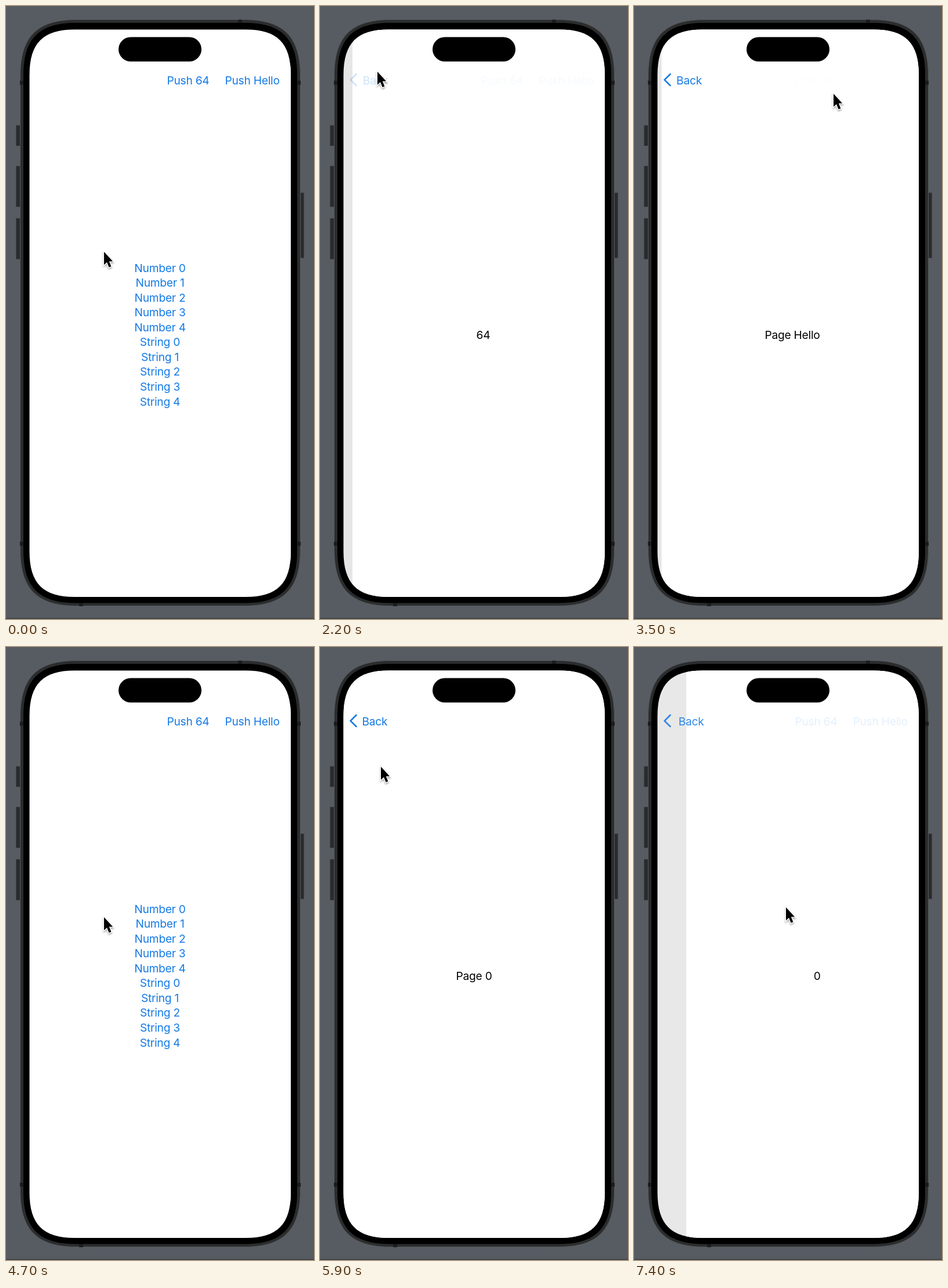
Recreate the animation shown at these times as an HTML page. Size 531x1055 px, loop 7500 ms.

```html
<!DOCTYPE html>
<html lang="en">
<head>
<meta charset="utf-8">
<title>Navigation demo</title>
<style>
  html, body { margin: 0; width: 100%; height: 100%; overflow: hidden; background: #565c62; }
  svg { display: block; width: 100vw; height: 100vh; }
  text { font: 400 19.2px Inter, Roboto, sans-serif; letter-spacing: -.25px; }
  .link { fill: #147ae6; }
  .mid { text-anchor: middle; }
  .side { fill: #2a2b2c; stroke: #3d3f41; }
  .band { fill: #1b1c1d; }
</style>
</head>
<body>
<svg viewBox="0 0 531 1055" xmlns="http://www.w3.org/2000/svg">
  <defs>
    <clipPath id="clip"><path id="screen"/></clipPath>
    <filter id="soft" x="-50%" y="-50%" width="200%" height="200%">
      <feDropShadow dx="0" dy="2" stdDeviation="1.6" flood-opacity=".4"/>
    </filter>
  </defs>

  <rect y="1053.5" width="531" height="1.5" fill="#3b4044"/>
  <g class="side">
    <rect x="17.5" y="205.5" width="7" height="35"/>
    <rect x="17.5" y="275.5" width="7" height="70"/>
    <rect x="17.5" y="365.5" width="7" height="70"/>
    <rect x="507.5" y="321.5" width="6" height="112"/>
  </g>
  <path id="shell" fill="#2b2c2d" stroke="#55585a"/>
  <g class="band">
    <rect x="24" y="128.500" width="6" height="7"/>
    <rect x="502" y="128.500" width="6" height="7"/>
    <rect x="24" y="922" width="6" height="7"/>
    <rect x="502" y="922" width="6" height="7"/>
    <rect x="400" y="23.500" width="7" height="6"/>
    <rect x="126" y="1027" width="7" height="6"/>
  </g>
  <path id="bezel"/>

  <g clip-path="url(#clip)">
    <rect x="40" y="40" width="452" height="978" fill="#fff"/>
    <g id="list" class="link mid"></g>
    <rect id="dim" x="40" y="40" width="452" height="978"/>
    <g id="page">
      <rect x="40" y="40" width="452" height="978" fill="#fff"/>
      <text id="title" class="mid" x="265.5" y="572.5"></text>
    </g>
    <g id="bar">
      <text id="push64" class="link" x="277.500" y="134.5">Push 64</text>
      <text id="hello" class="link" x="377.500" y="134.5">Push Hello</text>
    </g>
    <g id="back">
      <path d="M62.500 117.300L52.600 127.100L62.500 136.900" fill="none" stroke="#147ae6"
        stroke-width="2.700" stroke-linecap="round" stroke-linejoin="round"/>
      <text id="backText" class="link" y="134.5">Back</text>
    </g>
  </g>
  <rect x="194" y="53.500" width="143" height="42" rx="21"/>

  <g id="cursor" filter="url(#soft)">
    <path d="M1 1V23.500L6 19L9.600 27.800L13.400 26.200L9.800 17.500H16.200Z"
      stroke="#fff" stroke-width="2.400" paint-order="stroke"/>
  </g>
</svg>
<script>
const LOOP = 7500, STEP = 100, RATE = 14, WIDTH = 450;
const $ = id => document.getElementById(id);

// Rectangle with continuous corners of extent e
function squircle(l, t, r, b, e) {
  const c = e * 0.3;
  return `M${l + e} ${t}H${r - e}C${r - c} ${t} ${r} ${t + c} ${r} ${t + e}` +
    `V${b - e}C${r} ${b - c} ${r - c} ${b} ${r - e} ${b}` +
    `H${l + e}C${l + c} ${b} ${l} ${b - c} ${l} ${b - e}` +
    `V${t + e}C${l} ${t + c} ${l + c} ${t} ${l + e} ${t}Z`;
}
$('shell').setAttribute('d', squircle(24.5, 23.5, 507.5, 1032.5, 97));
$('bezel').setAttribute('d', squircle(30, 29, 502, 1027.5, 90));
$('screen').setAttribute('d', squircle(40.5, 40.5, 491, 1017, 78));

const rows = ['Number', 'String'].flatMap(kind => [0, 1, 2, 3, 4].map(n => `${kind} ${n}`));
const rowEls = {};
rows.forEach((label, i) => {
  const el = document.createElementNS('http://www.w3.org/2000/svg', 'text');
  el.setAttribute('x', 265.5);
  el.setAttribute('y', 457.5 + i * 25.56);
  el.textContent = label;
  $('list').append(rowEls[label] = el);
});

// Spring start, first visible time, opened page (null closes it)
const moves = [
  [780, 780, '64'], [2179, 2179, null],
  [3068, 3068, 'Page Hello'], [3925, 4200, null],
  [5084, 5084, 'Page 0'], [6179, 6179, null],
  [7132, 7132, '0']
];

// Pressed controls: element, from, to
const presses = [
  [$('push64'), 700, 2000], [$('back'), 1990, 2950],
  [$('hello'), 2980, 3900], [$('back'), 3980, 5000],
  [rowEls['String 0'], 5030, 5700], [$('back'), 6080, 7000],
  [rowEls['Number 0'], 7060, LOOP]
];

// Pointer: time, x, y
const track = [
  [0, 168, 422], [300, 225, 300], [600, 338, 93], [800, 335, 124], [1100, 335, 124],
  [1600, 188, 136], [1800, 128, 80], [2000, 98, 112], [2250, 98, 112],
  [2600, 250, 140], [2950, 402, 122], [3200, 402, 122], [3500, 343, 150],
  [3700, 178, 140], [3850, 125, 92], [4000, 106, 117], [4200, 106, 117],
  [4450, 118, 283], [4700, 168, 464], [5000, 242, 572], [5300, 242, 572],
  [5900, 104, 205], [6080, 92, 120], [6300, 92, 120], [6650, 170, 300],
  [7000, 261, 447], [LOOP, 261, 447]
];

const slope = (i, k) => {
  const a = track[i], b = track[i + 1];
  return a && b ? (b[k] - a[k]) / (b[0] - a[0]) : 0;
};

// Speed at a key: zero at turns and rests, otherwise the gentler side
function speed(i, k) {
  const a = slope(i - 1, k), b = slope(i, k);
  return a * b <= 0 ? 0 : Math.sign(a) * Math.min(Math.abs(a), Math.abs(b));
}

function pointer(t, k) {
  let i = track.length - 2;
  while (track[i][0] > t) i--;
  const a = track[i], b = track[i + 1], d = b[0] - a[0], s = (t - a[0]) / d, r = 1 - s;
  return r * r * (1 + 2 * s) * a[k] + s * s * (3 - 2 * s) * b[k] +
    d * s * r * (r * speed(i, k) - s * speed(i + 1, k));
}

function progress(t) {
  const move = moves.filter(m => m[1] <= t).pop();
  if (!move) return 0;
  const u = RATE * (t - move[0]) / 1000, rest = (1 + u) * Math.exp(-u);
  return move[2] === null ? rest : 1 - rest;
}

const shift = (el, x, y = 0) => el.setAttribute('transform', `translate(${x.toFixed(2)} ${y.toFixed(2)})`);

function draw(t) {
  const p = progress(t);
  const opened = moves.filter(m => m[1] <= t && m[2] !== null).pop();
  const alpha = el => presses.some(([e, a, b]) => e === el && t >= a && t < b) ? 0.22 : 1;

  $('title').textContent = opened ? opened[2] : '';
  shift($('page'), (1 - p) * WIDTH);
  shift($('list'), -0.3 * WIDTH * p);
  $('dim').setAttribute('opacity', 0.1 * p);
  $('bar').setAttribute('opacity', 1 - p);
  $('back').setAttribute('opacity', p * alpha($('back')));
  $('backText').setAttribute('x', 72.5 + 37 * (1 - p));
  for (const el of [$('push64'), $('hello'), rowEls['Number 0'], rowEls['String 0']])
    el.setAttribute('opacity', alpha(el));
  shift($('cursor'), pointer(t, 1), pointer(t, 2));
}

const begin = performance.now();
function tick(now) {
  const t = Math.max(0, now - begin) % LOOP;
  draw(Math.floor(t / STEP) * STEP);
  requestAnimationFrame(tick);
}
draw(0);
requestAnimationFrame(tick);
</script>
</body>
</html>
```
